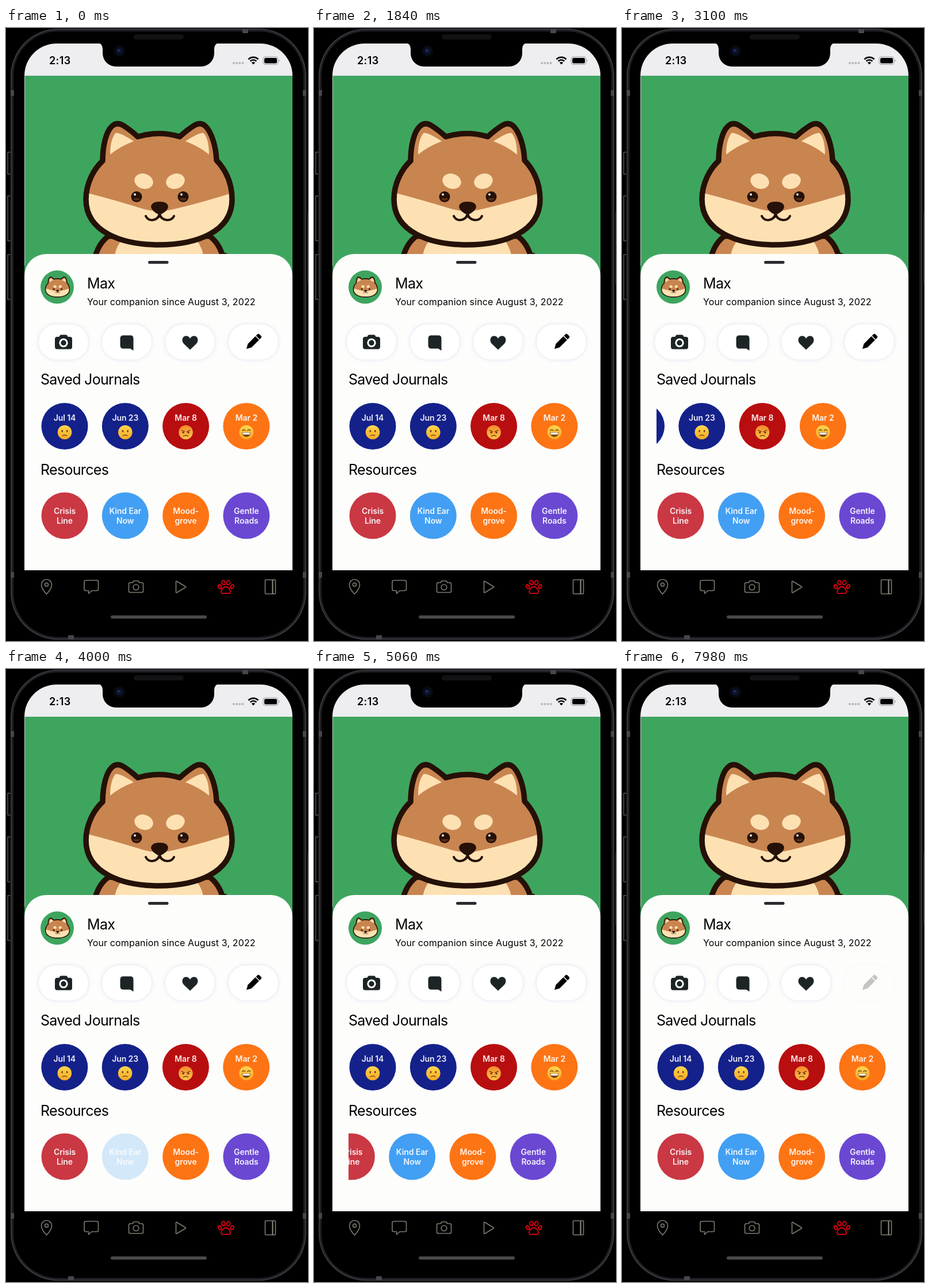
An HTML page for the animation above (8000 ms loop, 525 by 1066 pixels).

```html
<!DOCTYPE html>
<html lang="en">
<head>
<meta charset="utf-8">
<title>Companion profile</title>
<style>
html, body { margin: 0; width: 100%; height: 100%; overflow: hidden; background: #000; }
svg { display: block; }
text { font-family: Inter, Roboto, sans-serif; font-optical-sizing: none; }
.title { font-size: 25px; letter-spacing: -.68px; }
.label { font-size: 14px; font-weight: 600; letter-spacing: -.1px; text-anchor: middle; fill: #fff; fill-opacity: .92; }
.line { fill: none; stroke-linecap: round; stroke-linejoin: round; }
</style>
</head>
<body>
<svg width="525" height="1066" viewBox="0 0 525 1066">
  <defs>
    <clipPath id="screen"><path d="M32 943V83A56 56 0 0 1 88 27H442A56 56 0 0 1 498 83V943Z"/></clipPath>
    <clipPath id="row"><rect x="60" y="640" width="410" height="270"/></clipPath>
    <path id="headShape" d="M168 231C168 205 174 180 184 171Q192 163 203 169Q216 177 229 189Q266 178 302 189Q315 177 328 169Q339 163 347 171C357 181 365 205 366 230C382 247 393 270 393 298C393 355 330 377 266 377C202 377 139 355 139 298C139 272 151 247 168 231Z"/>
    <clipPath id="headClip"><use href="#headShape"/></clipPath>
    <filter id="glow" x="-30%" y="-30%" width="160%" height="160%">
      <feDropShadow dx="0" dy="0" stdDeviation="3" flood-color="#c4c3e0" flood-opacity=".55"/>
    </filter>
    <linearGradient id="yellow" x2="0" y2="1"><stop stop-color="#ffd64f"/><stop offset="1" stop-color="#f5a925"/></linearGradient>
    <linearGradient id="amber" x2="0" y2="1"><stop stop-color="#f58a2c"/><stop offset="1" stop-color="#fcc248"/></linearGradient>

    <g id="halfFace">
      <path d="M181 220Q181 195 190 183Q196 180 222 197Q198 206 181 220Z" fill="#fde1b3"/>
      <ellipse cx="239.5" cy="266.5" rx="16.5" ry="13" transform="rotate(18 239.5 266.5)" fill="#fde1b3"/>
    </g>
    <g id="eye">
      <circle r="9.500" fill="#251107"/>
      <path d="M-6 2.500a6.500 6.500 0 0 0 12 0z" fill="#5a2f17"/>
      <circle cx="-3" cy="-4" r="1.900" fill="#fff"/>
    </g>
    <g id="head">
      <use href="#headShape" fill="#c98550"/>
      <path clip-path="url(#headClip)" d="M134 285Q185 298 240 315Q266 322 292 315Q350 301 398 285V390H134Z" fill="#fde1b3"/>
      <use href="#headShape" class="line" stroke="#251107" stroke-width="9.500"/>
      <use href="#halfFace"/>
      <use href="#halfFace" transform="matrix(-1 0 0 1 534 0)"/>
      <use href="#eye" x="227" y="293.500"/><use href="#eye" x="308" y="293.500"/>
      <path d="M252 311Q253 302 267 302Q281 302 282 311Q281 317 273 322Q267 326 261 322Q253 317 252 311Z" fill="#251107"/>
      <path class="line" d="M243 327Q246 334 254 334Q265 333 267 323Q269 333 280 334Q289 334 292 327" stroke="#251107" stroke-width="4"/>
    </g>

    <g id="sad">
      <circle r="12.300" fill="url(#yellow)"/>
      <ellipse cx="-4.300" cy="-2" rx="1.400" ry="2" fill="#6b431a"/><ellipse cx="4.300" cy="-2" rx="1.400" ry="2" fill="#6b431a"/>
      <path class="line" d="M-4 6Q0 3.500 4 6" stroke="#7a4c1c" stroke-width="1.300"/>
    </g>
    <g id="angry">
      <circle r="12.300" fill="url(#amber)"/>
      <circle cx="-4.500" cy=".5" r="1.500" fill="#5a2d10"/><circle cx="4.500" cy=".5" r="1.500" fill="#5a2d10"/>
      <path class="line" d="M-7.500 -3.500L-2 -1M7.500 -3.500L2 -1M-4 6.800Q0 4 4 6.800" stroke="#5a2d10" stroke-width="1.300"/>
    </g>
    <g id="grin">
      <circle r="12.300" fill="url(#yellow)"/>
      <path class="line" d="M-7 -3Q-4.500 -6 -2 -3M2 -3Q4.500 -6 7 -3" stroke="#6b431a" stroke-width="1.300"/>
      <path d="M-7.500 0H7.500Q6.500 8 0 8Q-6.500 8 -7.500 0Z" fill="#7a4420"/><path d="M-6.500 .5H6.500Q6.500 3.500 5 4H-5Q-6.500 3.500 -6.500 .5Z" fill="#fff"/>
    </g>
  </defs>

  <rect width="525" height="1066"/>
  <!-- Phone body -->
  <g class="line">
    <rect x="10.500" y="3.500" width="509" height="1058" rx="80" stroke="#1f2024" stroke-width="5"/>
    <rect x="9" y="2" width="512" height="1061" rx="82" stroke="#45464c" stroke-width="1.200"/>
    <path d="M7 216H3V254H7M7 292H3V370H7M7 394H3V472H7" stroke="#55565c" stroke-width="1.500"/>
    <path d="M524.500 320V445" stroke="#2a2b30"/>
  </g>
  <path d="M411 2h10v7h-10zM108 1056h10v7h-10zM8 108h6v10h-6zM516 108h6v10h-6zM8 946h6v10h-6zM516 946h6v10h-6z" fill="#46474d"/>
  <rect x="222" y="11" width="87" height="9" rx="4.500" fill="#121214"/>

  <!-- Status bar and portrait -->
  <g clip-path="url(#screen)">
    <rect x="32" y="27" width="466" height="57" fill="#eeedf0"/>
    <rect x="32" y="83" width="466" height="400" fill="#3ea55f"/>
    <rect x="32" y="83" width="1" height="330" fill="#b9d8c3"/>
    <path d="M374 391L384 391L380 400H370Z" fill="#251107"/>
    <path d="M178 362Q160 375 154 402H378Q372 375 354 362Z" fill="#c98550" stroke="#251107" stroke-width="9.500"/>
    <path d="M200 370Q190 383 188 402H344Q342 383 332 370Z" fill="#fde1b3"/>
    <use href="#head"/>
    <path d="M32 943V431A38 38 0 0 1 70 393H460A38 38 0 0 1 498 431V943Z" fill="#fdfdfc"/>
  </g>
  <path d="M160 26A8 10 0 0 1 168 36V44A23 23 0 0 0 191 67H339A23 23 0 0 0 362 44V36A8 10 0 0 1 370 26Z"/>
  <circle cx="197" cy="40" r="10" fill="#080a12"/><circle cx="197" cy="40" r="5.500" fill="#0d1430"/><circle cx="196" cy="39" r="2" fill="#1f3270"/>
  <text x="75" y="63" font-size="18" font-weight="600" letter-spacing=".4">2:13</text>
  <g fill="#b7b7ba"><circle cx="396" cy="61" r="2"/><circle cx="401.200" cy="61" r="2"/><circle cx="406.400" cy="61" r="2"/><circle cx="411.600" cy="61" r="2"/></g>
  <path d="M421.500 54.500A12 12 0 0 1 438.500 54.500M424.700 57.700A7.500 7.500 0 0 1 435.300 57.700" fill="none" stroke="#000" stroke-width="2.700"/>
  <path d="M430 63.500L426.900 60.300A4.400 4.400 0 0 1 433.100 60.300Z"/>
  <rect x="447" y="50" width="26" height="13.500" rx="4" fill="none" stroke="#98989f"/>
  <rect x="449" y="52" width="22" height="9.500" rx="2.500"/><path d="M474.500 54.500q2.500 2 0 4.500z" fill="#98989f"/>

  <!-- Sheet -->
  <rect x="247" y="405" width="35.500" height="5" rx="2.500" fill="#2c2a2e"/>
  <circle cx="89" cy="450.500" r="29" fill="#3ea55f"/>
  <use href="#head" transform="translate(89.500 450.500) scale(.165) translate(-266 -272)"/>
  <text class="title" x="141" y="453">Max</text>
  <text x="141" y="481.500" font-size="16" letter-spacing=".12">Your companion since August 3, 2022</text>
  <text class="title" x="60" y="620">Saved Journals</text>
  <text class="title" x="60" y="777">Resources</text>
  <g id="actions"></g>
  <g clip-path="url(#row)"><g id="journals"></g></g>
  <g clip-path="url(#row)"><g id="resources"></g></g>

  <!-- Tab bar -->
  <g class="line" stroke="#7d7c70" stroke-width="1.600">
    <path d="M70.500 984.500Q61.500 975 61.500 968A9 9 0 0 1 79.500 968Q79.500 975 70.500 984.500Z"/><circle cx="70.500" cy="968" r="3"/>
    <path d="M139 960.500H158Q160.500 960.500 160.500 963V976Q160.500 978.500 158 978.500H149L143.500 983.500V978.500H139Q136 978.500 136 976V963Q136 960.500 139 960.500Z"/>
    <path d="M216 964.500H220L222 961.500H230L232 964.500H236Q238.500 964.500 238.500 967V979Q238.500 981.500 236 981.500H216Q213.500 981.500 213.500 979V967Q213.500 964.500 216 964.500Z"/><circle cx="226" cy="972.500" r="4.800"/>
    <path d="M295.500 963V981Q295.500 982.500 297 981.700L312 972.700Q313 972 312 971.300L297 962.300Q295.500 961.500 295.500 963Z"/>
    <rect x="450.500" y="959.500" width="18" height="24.500" rx="1"/><path d="M463.500 960V983.500" stroke-width="2.400"/>
    <g stroke="#e60012" stroke-width="1.800">
      <path d="M382 971.500C386 971.500 390 976.500 390 980.500C390 985 385 983 382 983C379 983 374 985 374 980.500C374 976.500 378 971.500 382 971.500Z"/>
      <ellipse cx="378" cy="964.500" rx="2.900" ry="4" transform="rotate(-12 378 964.500)"/><ellipse cx="386.500" cy="964.500" rx="2.900" ry="4" transform="rotate(12 386.500 964.500)"/>
      <ellipse cx="371.500" cy="971.500" rx="2.500" ry="3.600" transform="rotate(-28 371.500 971.500)"/><ellipse cx="393" cy="971.500" rx="2.500" ry="3.600" transform="rotate(28 393 971.500)"/>
    </g>
  </g>
  <rect x="182" y="1021.500" width="167" height="5.500" rx="2.750" fill="#4a4a48"/>
</svg>
<script>
const LOOP = 8000;
const byId = id => document.getElementById(id);

const icons = [
  `<path fill="#1c2426" d="M-11 -9H-7.500Q-6.500 -12.500 -4 -12.500H4Q6.500 -12.500 7.500 -9H11Q15 -9 15 -5V8.500Q15 12.500 11 12.500H-11Q-15 12.500 -15 8.500V-5Q-15 -9 -11 -9Z"/><circle cy="1.500" r="6.200" fill="none" stroke="#fff" stroke-width="3"/>`,
  `<path fill="#1c2426" d="M-6 -11.500H6.500Q11.500 -11.500 11.500 -6V15L6 11.500H-6Q-11.500 11.500 -11.500 6V-6Q-11.500 -11.500 -6 -11.500Z"/>`,
  `<path fill="#1c2426" d="M0 13.500L-11 3C-16 -2.500 -13 -10.500 -7 -10.500C-3.500 -10.500 -1.500 -8.500 0 -6C1.500 -8.500 3.500 -10.500 7 -10.500C13 -10.500 16 -2.500 11 3Z"/>`,
  `<g transform="rotate(45)"><path d="M-4.500 -9.500H4.500V9L0 17L-4.500 9Z"/><path d="M-4.500 -11V-14Q-4.500 -17 -1.500 -17H1.500Q4.500 -17 4.500 -14V-11Z"/></g>`
];
byId("actions").innerHTML = icons.map((icon, i) =>
  `<g transform="translate(${100 + 110 * i} 546)"><rect x="-43" y="-30.500" width="86" height="61" rx="30.500" fill="#fff" filter="url(#glow)"/>${icon}</g>`
).join("");

function bubbles(id, y, items, content) {
  byId(id).innerHTML = items.map(([color, ...rest], i) =>
    `<g transform="translate(${102 + 105.3 * i} ${y})"><circle r="40.500" fill="${color}"/>${content(...rest)}</g>`
  ).join("");
}
const label = (text, y) => `<text class="label" y="${y}">${text}</text>`;

bubbles("journals", 692.5, [
  ["#14218a", "Jul 14", "sad"],
  ["#14218a", "Jun 23", "sad"],
  ["#b80e10", "Mar 8", "angry"],
  ["#fd7414", "Mar 2", "grin"]
], (date, mood) => label(date, -9.5) + `<use href="#${mood}" y="10.500"/>`);

bubbles("resources", 848, [
  ["#c93843", "Crisis", "Line"],
  ["#429ff3", "Kind Ear", "Now"],
  ["#fd7414", "Mood-", "grove"],
  ["#6a48d2", "Gentle", "Roads"]
], (top, bottom) => label(top, -3) + label(bottom, 13.5));

const journals = byId("journals"), resources = byId("resources");
const talkButton = resources.children[1], pencilButton = byId("actions").children[3];

const smooth = p => { p = Math.min(1, Math.max(0, p)); return p * p * (3 - 2 * p); };

// Overscroll: drag to the left, hold, then a critically damped return.
function overscroll(t) {
  const back = Math.max(0, t - 750) / 100;
  return -68.5 * smooth(t / 500) * (1 + back) * Math.exp(-back);
}

function pressOpacity(t, start, end) {
  return 1 - .78 * smooth((t - start) / 120) * (1 - smooth((t - end) / 150));
}

function draw(t) {
  journals.setAttribute("transform", `translate(${overscroll(t - 2450).toFixed(2)} 0)`);
  resources.setAttribute("transform", `translate(${overscroll(t - 4154).toFixed(2)} 0)`);
  talkButton.setAttribute("opacity", pressOpacity(t, 3870, 4150));
  pencilButton.setAttribute("opacity", pressOpacity(t, 7850, LOOP));
}

const start = performance.now();
function tick() {
  draw((performance.now() - start) % LOOP);
  requestAnimationFrame(tick);
}
tick();
</script>
</body>
</html>
```
